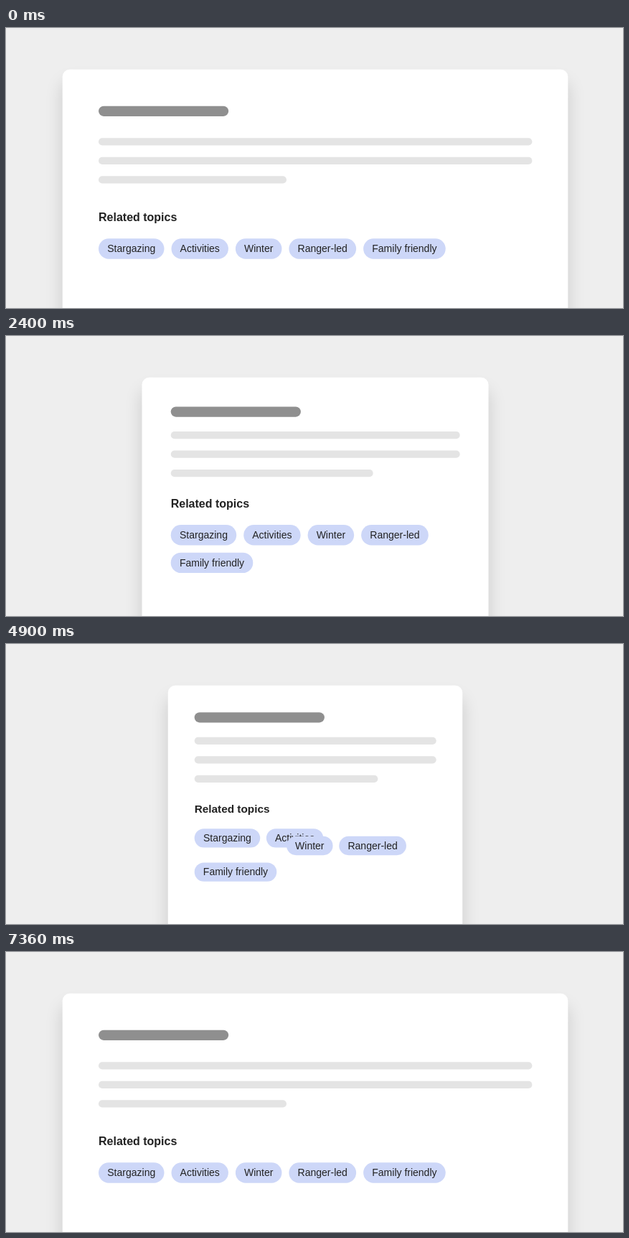
An HTML page with a canvas that plays this animation: 860x390 px, repeating every 7880 ms.

```html
<!DOCTYPE html>
<html lang="en">
<head>
<meta charset="utf-8">
<title>Responsive topic chips</title>
<style>
  html, body { margin: 0; width: 100%; height: 100%; overflow: hidden; background: #eee; }
  canvas { display: block; }
</style>
</head>
<body>
<canvas id="stage" width="860" height="390"></canvas>
<script>
const ctx = document.getElementById('stage').getContext('2d');
const FONT = '"Liberation Sans", Arial, sans-serif';
const LOOP = 7880, DURATION = 800;

const chips = [
  ['Stargazing', 91.5], ['Activities', 79.4], ['Winter', 64.5],
  ['Ranger-led', 93.7], ['Family friendly', 114.6]
];

const wide = {
  card: 78.7, left: 129, title: 108.7, lines: 153.3, lastLine: 262,
  heading: 269.4, headingSize: 16, chipHeight: 28.4, pos: placeChips(129, 293.3, 10, 0, [5])
};
const medium = {
  card: 189.5, left: 229.7, title: 98.5, lines: 133, lastLine: 282,
  heading: 238.9, headingSize: 16, chipHeight: 28.4, pos: placeChips(229.7, 263.1, 10, 38.6, [4, 1])
};
const narrow = {
  card: 300.2, left: 330.4, title: 88.4, lines: 122.9, lastLine: 201.6,
  heading: 225.6, headingSize: 14, chipHeight: 22.2, pos: placeChips(330.4, 244.9, 6, 32.5, [2, 2, 1])
};
const moves = [
  [700, wide, medium], [2550, medium, narrow],
  [4505, narrow, medium], [6560, medium, wide]
];

function placeChips(left, top, gap, rowStep, rows) {
  let i = 0;
  return rows.flatMap((count, row) => {
    let x = left;
    return Array.from({ length: count }, () => {
      const spot = { x, y: top + row * rowStep };
      x += chips[i++][1] + gap;
      return spot;
    });
  });
}

// Cubic Bezier (.7, 0, .16, 1), solved by bisection
function ease(t) {
  if (t <= 0 || t >= 1) return t <= 0 ? 0 : 1;
  let lo = 0, hi = 1;
  for (let i = 0; i < 24; i++) {
    const s = (lo + hi) / 2, r = 1 - s;
    const x = 3 * r * r * s * 0.7 + 3 * r * s * s * 0.16 + s ** 3;
    if (x < t) lo = s; else hi = s;
  }
  return lo * lo * (3 - 2 * lo);
}

function mix(a, b, p) {
  if (typeof a === 'number') return a + (b - a) * p;
  if (Array.isArray(a)) return a.map((v, i) => mix(v, b[i], p));
  return Object.fromEntries(Object.keys(a).map(k => [k, mix(a[k], b[k], p)]));
}

function layoutAt(time) {
  const [start, from, to] = moves.findLast(m => time >= m[0]) || [0, wide, wide];
  return mix(from, to, ease((time - start) / DURATION));
}

function pill(x, y, w, h, color, radius = h / 2) {
  ctx.fillStyle = color;
  ctx.beginPath();
  ctx.roundRect(x, y, w, h, radius);
  ctx.fill();
}

function text(str, x, y, font, align) {
  ctx.fillStyle = '#222';
  ctx.font = `${font} ${FONT}`;
  ctx.textAlign = align;
  ctx.fillText(str, x, y);
}

function draw(s) {
  ctx.fillStyle = '#eee';
  ctx.fillRect(0, 0, 860, 390);

  ctx.save();
  ctx.shadowColor = 'rgba(0, 0, 0, .15)';
  ctx.shadowBlur = 24;
  ctx.shadowOffsetY = 18;
  pill(s.card, 57.7, 862 - 2 * s.card, 500, '#fff', 10);
  ctx.restore();

  const lineWidth = 862.4 - 2 * s.left;
  pill(s.left, s.title, 181.2, 14.2, '#8f8f8f');
  [lineWidth, lineWidth, s.lastLine].forEach((w, i) =>
    pill(s.left, s.lines + i * 26.5, w, 10.2, '#e4e4e4'));

  text('Related topics', s.left, s.heading, `bold ${s.headingSize}px`, 'left');
  chips.forEach(([label, w], i) => {
    const { x, y } = s.pos[i];
    pill(x, y, w, s.chipHeight, '#cdd7f8');
    text(label, x + w / 2, y + s.chipHeight / 2 + 4.6, '14px', 'center');
  });
}

const origin = performance.now();
function frame() {
  draw(layoutAt((performance.now() - origin) % LOOP));
  requestAnimationFrame(frame);
}
frame();
</script>
</body>
</html>
```
